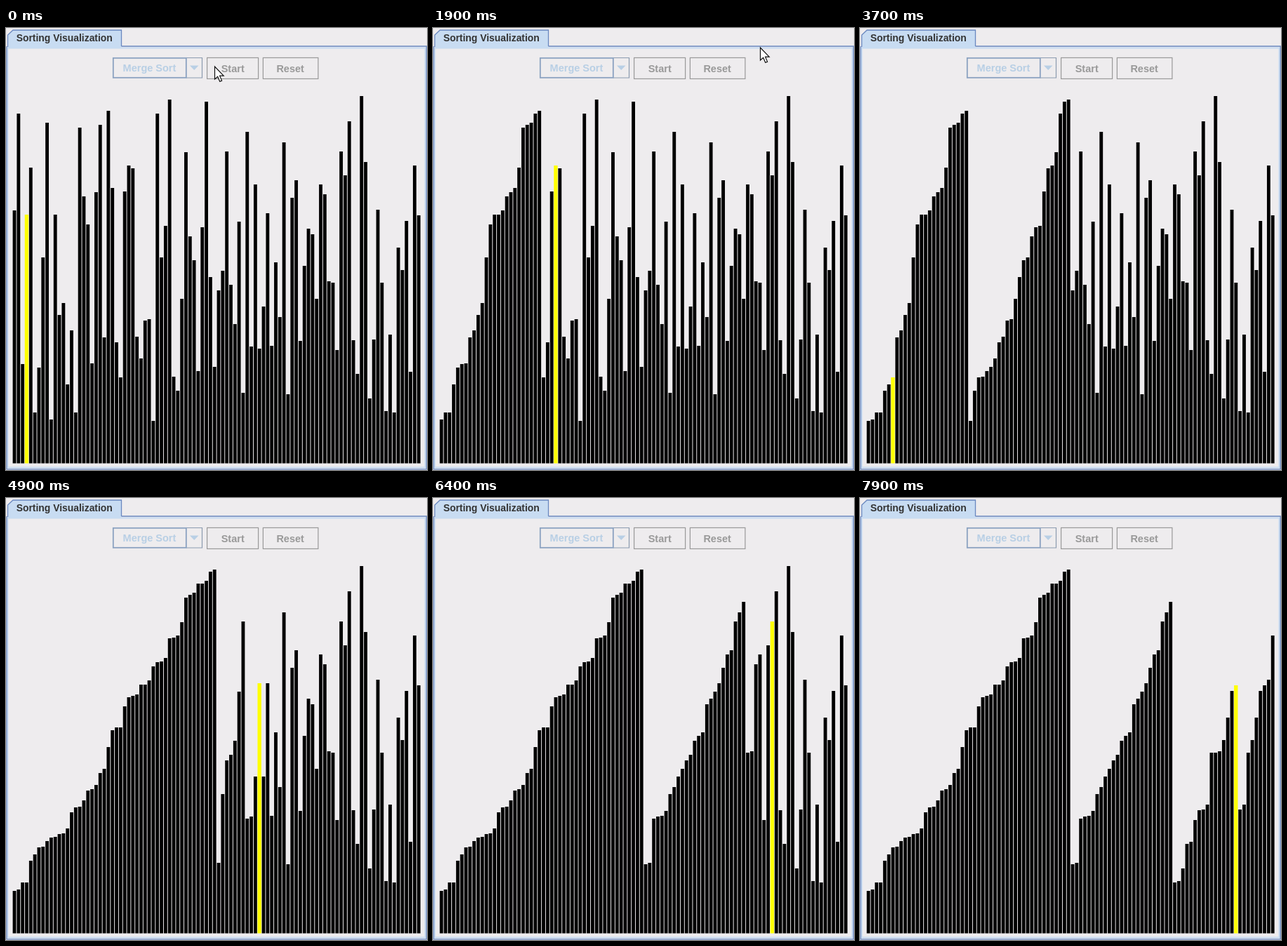
Write an HTML page with a canvas that moves like this. It is 600 px wide and 630 px high and loops after 8000 ms.

```html
<!DOCTYPE html>
<html lang="en">
<head>
<meta charset="utf-8">
<title>Sorting Visualization</title>
<style>
  html, body { margin: 0; width: 100%; height: 100%; overflow: hidden; background: #eeecee; }
  svg, canvas { position: absolute; left: 0; top: 0; width: 600px; height: 630px; }
  text { font: bold 14.5px "Liberation Sans", Arial, sans-serif; }
</style>
</head>
<body>
<canvas id="bars" width="600" height="630"></canvas>
<svg viewBox="0 0 600 630" fill="none">
  <!-- pane edge -->
  <path d="M2.5 28.5H597.5V626.5H2.5Z" stroke="#c8dcf2" stroke-width="2"/>
  <path d="M164 26H599.2V628.8H1V26" stroke="#6a88c0" stroke-width="1.3"/>
  <!-- tab -->
  <path d="M2.5 29V10L10 3H164.5V29Z" fill="#c8dcf2"/>
  <path d="M2.5 27V10L10 3H164.5V26" stroke="#6a88c0" stroke-width="1.3"/>
  <text x="14.7" y="19" fill="#333" style="font-size:13.9px">Sorting Visualization</text>
  <!-- combo box -->
  <path d="M257 42.5H279.5V71H257" stroke="#8c9bb0" stroke-width="1.2"/>
  <rect x="152.8" y="42.8" width="104" height="28" stroke="#8ba2c0" stroke-width="1.8"/>
  <path d="M262 53.5H274.5L268.2 60Z" fill="#b8cfe5"/>
  <text x="166.6" y="62" fill="#b8cfe5">Merge Sort</text>
  <!-- buttons -->
  <g stroke="#999" stroke-width="1.2">
    <rect x="286.6" y="42.4" width="73" height="30"/>
    <rect x="366.4" y="42.4" width="78.5" height="30"/>
  </g>
  <text x="306.7" y="63" fill="#999">Start</text>
  <text x="385.4" y="63" fill="#999">Reset</text>
  <path id="pointer" d="M.5 0V18L4.7 14.2L7.7 21.3L10.6 20.1L7.6 13.2H13.2Z" fill="#fff" stroke="#111" stroke-width="1.2"/>
</svg>
<script>
const LOOP = 8000, TICK = 100;
const WRITES_PER_TICK = 6.45, WRITE_OFFSET = 0.4;
const PITCH = 5.82, LEFT = 9.6, BAR = 4.85, FLOOR = 620.5;

// Top edge of each bar when the loop begins
const tops = [
  260, 122, 479, 266, 199, 548, 484, 327, 135, 558, 266, 409, 392, 508, 431, 548, 142, 240, 280, 478,
  234, 138, 441, 118, 228, 448, 498, 233, 196, 200, 440, 471, 417, 415, 560, 122, 327, 282, 102, 497,
  517, 386, 177, 297, 331, 489, 284, 105, 355, 483, 374, 346, 176, 366, 422, 276, 520, 148, 454, 223,
  457, 397, 264, 453, 334, 412, 163, 522, 242, 217, 446, 339, 286, 294, 386, 223, 237, 361, 363, 459,
  176, 210, 133, 445, 493, 97, 191, 528, 444, 259, 363, 546, 437, 548, 313, 345, 275, 490, 196, 267
];

// Record every write of a top-down merge sort as [index, top]
function recordSort(source) {
  const a = source.slice(), writes = [];
  function sort(lo, hi) {
    if (lo >= hi) return;
    const mid = (lo + hi) >> 1;
    sort(lo, mid);
    sort(mid + 1, hi);
    const l = a.slice(lo, mid + 1), r = a.slice(mid + 1, hi + 1);
    for (let k = lo; k <= hi; k++) {
      a[k] = !r.length || (l.length && l[0] >= r[0]) ? l.shift() : r.shift();
      writes.push([k, a[k]]);
    }
  }
  sort(0, a.length - 1);
  return writes;
}

const writes = recordSort(tops);
const FIRST = 3; // the two leading pairs are already merged

// Pointer keys: time, x, y
const path = [[1400, 297, 55], [1600, 345, 58], [1800, 449, 58], [1900, 466, 28], [2000, 468, 4]];

function pointerAt(t) {
  if (t <= path[0][0]) return path[0].slice(1);
  const i = path.findIndex(p => p[0] >= t);
  if (i < 0) return null;
  const [t0, x0, y0] = path[i - 1], [t1, x1, y1] = path[i];
  const f = (t - t0) / (t1 - t0);
  return [x0 + (x1 - x0) * f, y0 + (y1 - y0) * f];
}

const ctx = document.getElementById("bars").getContext("2d");
const pointer = document.getElementById("pointer");

function draw(tick) {
  const last = FIRST + Math.floor(WRITE_OFFSET + tick * WRITES_PER_TICK);
  const a = tops.slice();
  for (let i = 0; i <= last; i++) a[writes[i][0]] = writes[i][1];
  const active = writes[last][0];

  ctx.clearRect(0, 0, 600, 630);
  ctx.fillStyle = "#000";
  a.forEach((top, i) => {
    if (i !== active) ctx.fillRect(LEFT + i * PITCH, top, BAR, FLOOR - top);
  });
  ctx.fillStyle = "#ff0";
  ctx.fillRect(LEFT + active * PITCH - 0.3, a[active], BAR + 0.5, FLOOR - a[active]);

  const p = pointerAt(tick * TICK);
  pointer.style.display = p ? "" : "none";
  if (p) pointer.setAttribute("transform", `translate(${p[0]} ${p[1]})`);
}

let shown = -1;
const start = performance.now();
function frame() {
  const tick = Math.floor(((performance.now() - start) % LOOP) / TICK);
  if (tick !== shown) draw(shown = tick);
  requestAnimationFrame(frame);
}
frame();
</script>
</body>
</html>
```
